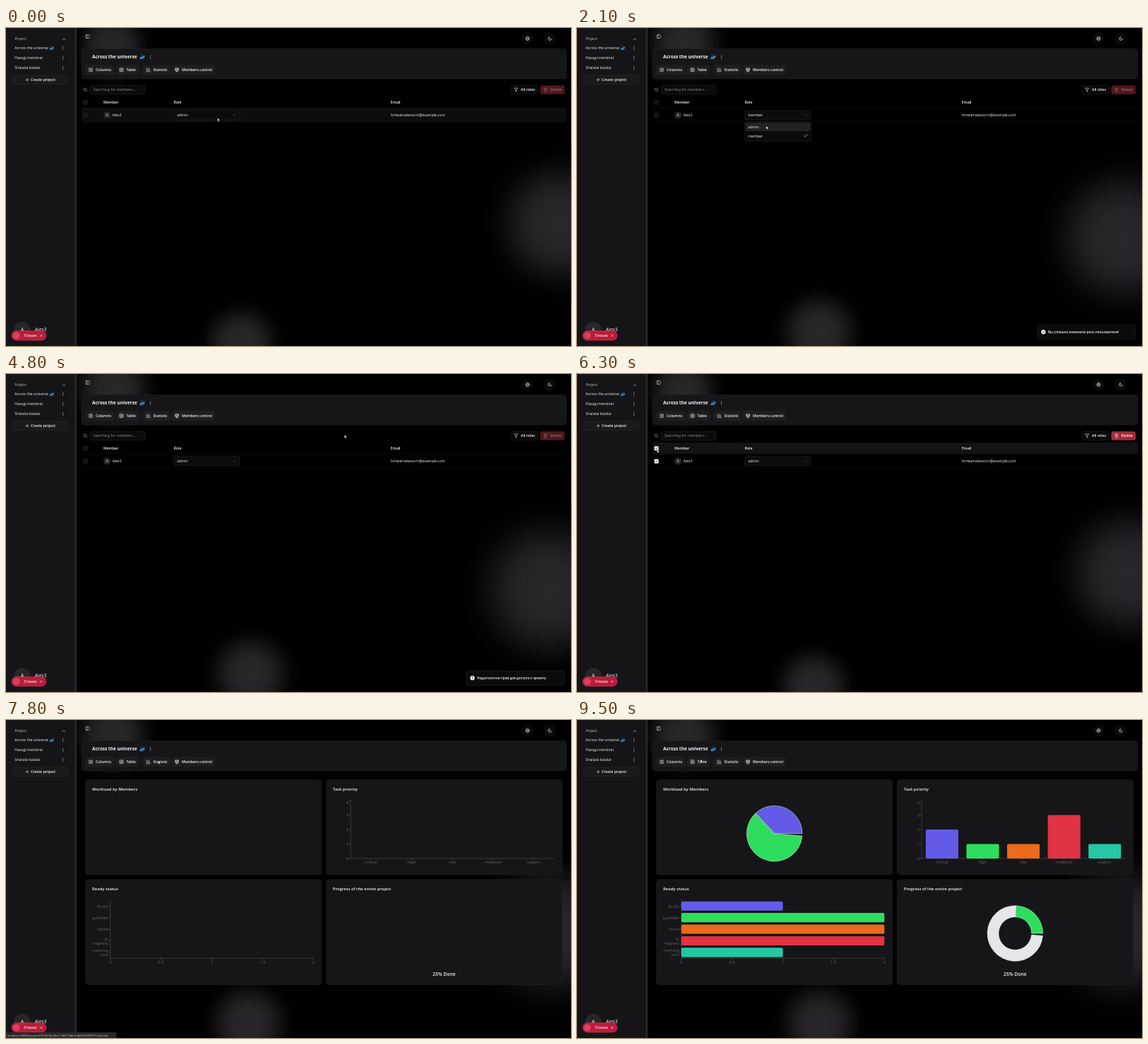
An HTML page that plays this animation: 800x450 px, repeating every 9.6 s.

```html
<!DOCTYPE html>
<html lang="en">
<head>
<meta charset="utf-8">
<title>Members and statistics</title>
<style>
  html, body { margin: 0; width: 100%; height: 100%; overflow: hidden; background: #000; }
  svg { display: block; width: 800px; height: 450px; font-family: "Open Sans", "Noto Sans", sans-serif; }
  text { white-space: pre; }
</style>
</head>
<body>
<svg id="stage" viewBox="0 0 800 450" xmlns="http://www.w3.org/2000/svg"></svg>
<script>
const LOOP = 9600, STEP = 100;
const INK = '#f4f4f5', LINE = '#232327', CARD = '#161618', AXIS = '#666';
const COLORS = ['#635be8', '#2edd5e', '#ec6a1b', '#e03344', '#24c8a5'];
const stage = document.getElementById('stage');

// markup helpers
const text = (x, y, s, size = 5.15, o = {}) =>
  `<text x="${x}" y="${(y + size * 0.36).toFixed(2)}" font-size="${size}" font-weight="${o.w || 400}" ` +
  `fill="${o.fill || INK}" text-anchor="${o.anchor || 'start'}"${o.id ? ` id="${o.id}"` : ''}>${s}</text>`;
const box = (x, y, x2, y2, fill, r = 0, stroke = 'none', extra = '') =>
  `<rect x="${x}" y="${y}" width="${x2 - x}" height="${y2 - y}" rx="${r}" fill="${fill}" stroke="${stroke}" stroke-width=".5" ${extra}/>`;
const line = (d, color = INK, w = 0.55, extra = '') =>
  `<path d="${d}" fill="none" stroke="${color}" stroke-width="${w}" stroke-linecap="round" stroke-linejoin="round" ${extra}/>`;
const dots = (x, y) => [-2, 0, 2].map(d => `<circle cx="${x}" cy="${y + d}" r=".5" fill="${INK}"/>`).join('');
const group = (id, body, extra = '') => `<g id="${id}" ${extra}>${body}</g>`;
const bold = { w: 600 };

const picture = (x, y, s) => `<g transform="translate(${x} ${y}) rotate(14) scale(${s})">
  <rect x="-3" y="-3.5" width="6" height="7" rx="1" fill="#16304f"/>
  <path d="M-3 1L3-3V0L-1 3.4H-3Z" fill="#4b86b4"/><circle cx="1" cy="1.6" r="1" fill="#254f86"/></g>`;

const icons = {
  grid: (x, y) => [[-2.5, -2.5], [.5, -2.5], [-2.5, .5], [.5, .5]]
    .map(([a, b]) => box(x + a, y + b, x + a + 2, y + b + 2, 'none', .4, INK)).join(''),
  table: (x, y) => box(x - 2.5, y - 2.5, x + 2.5, y + 2.5, 'none', .6, INK) +
    line(`M${x} ${y - 2.5}v5M${x - 2.5} ${y - .8}h5M${x - 2.5} ${y + .9}h5`, INK, .45),
  chart: (x, y) => line(`M${x - 2.4} ${y - 2.6}v5.1h5M${x - .8} ${y + 1}v-2M${x + .7} ${y + 1}v-3.6M${x + 2.1} ${y + 1}v-1.2`),
  board: (x, y) => box(x - 2.5, y - 2.4, x + 2.5, y + 1, '#777', .5, INK) + line(`M${x} ${y + 1}v1.5M${x - 1.4} ${y + 2.5}h2.8`)
};

function sidebar() {
  const items = [['Across the universe', 28.5], ['Hasagi mentinel', 42.5], ['Shalalai balalai', 56.5]];
  return box(0, 0, 98, 450, '#151517') + box(97.5, 0, 100, 450, '#29292b') +
    text(12.5, 15.5, 'Projects', 4.4, { fill: '#c9c9cc' }) + line('M80 16.6l1.8-1.8 1.8 1.8') +
    items.map(([s, y]) => text(12.3, y, s, 5.25) + dots(80.5, y - .3)).join('') + picture(65, 28.5, .85) +
    box(9.5, 67, 88, 79.5, '#1a1a1d', 3, '#2c2c30') + line('M28 73.3h4M30 71.3v4') +
    text(35, 73.5, 'Create project', 5.15, bold) +
    `<circle cx="23" cy="427.5" r="11.7" fill="#27272a"/>` + text(23, 427, 'A', 6.6, { anchor: 'middle' }) +
    text(40.8, 426.5, 'Alex3', 6.7) +
    box(8, 428.5, 57, 442, '#be1a3b', 6.7, '#d63a58') + `<circle cx="14.7" cy="435.3" r="5" fill="#d8405c"/>` +
    text(25, 435.3, '3 Issues', 4.9, bold) + line('M48.3 433.9l2.8 2.8M51.1 433.9l-2.8 2.8');
}

function header() {
  const tabs = [['Columns', 'grid', 113, 153], ['Table', 'table', 156.5, 188], ['Statistic', 'chart', 194.5, 232], ['Members control', 'board', 235, 295.5]];
  return box(113, 9.5, 118, 14.5, 'none', .8, INK) + line('M114.8 9.6v4.8') +
    `<circle cx="738.5" cy="15" r="6.8" fill="#0a0a0b" stroke="${LINE}" stroke-width=".5"/>
     <g fill="none" stroke="${INK}" stroke-width=".5"><circle cx="738.5" cy="15" r="2.6"/><ellipse cx="738.5" cy="15" rx="1.1" ry="2.6"/></g>` +
    line('M736 15h5', INK, .45) + box(763, 8.5, 776, 21.5, '#0a0a0b', 3, LINE) +
    line('M769.6 12.7a2.4 2.4 0 1 0 2.7 2.7a1.9 1.9 0 0 1-2.7-2.7') +
    box(107, 29.5, 793.8, 72, CARD, 4, LINE) + text(122, 41, 'Across the universe', 6.5, { w: 700 }) +
    picture(193, 41.2, 1) + dots(204.5, 41) +
    tabs.map(([s, icon, a, b]) => box(a, 52.7, b, 65.7, '#1e1e21', 3, '#262629') + icons[icon](a + 7, 59.2) +
      text(a + 14, 59.2, s, 5.2, bold)).join('');
}

const checkbox = (y) => box(109.6, y - 2.9, 115.4, y + 2.9, '#111', 1.2, '#3a3a3d');
const checked = (y) => box(109.5, y - 3, 115.5, y + 3, INK, 1.2) + line(`M111 ${y}l1.1 1.2 2-2.4`, '#111', .7);

function members() {
  return box(107, 97, 793.8, 113, '#131315', 0, 'none', 'id="headHover"') +
    box(107, 113, 793.8, 133, '#0d0d0f', 0, 'none', 'id="rowHover"') +
    line('M107 113H793.8M107 133H793.8', '#151517', .5) +
    `<circle cx="112" cy="87" r="1.9" fill="none" stroke="#bbb" stroke-width=".55"/>` + line('M113.4 88.5l1.5 1.5', '#bbb') +
    box(119, 81.2, 197, 93.8, '#0b0b0c', 3, '#29292d') + text(123.7, 87.6, 'Searching for members...', 5.13, { fill: '#8e8e95' }) +
    box(715, 81.2, 753.5, 93.8, '#0a0a0b', 3, LINE) + line('M719.8 85h5l-2 2.5v2.6l-1-.6v-2z') + text(729, 87.6, 'All roles', 5.2, bold) +
    group('delete', box(756.5, 81.2, 791, 93.8, '#a52c3a', 3) +
      line('M761.4 85.7h4.6M762.2 85.8l.3 4.4h2.6l.3-4.4M762.9 85.5v-.8h1.7v.8M763.2 87v2M764.3 87v2', INK, .45) +
      text(770.5, 87.6, 'Delete', 5.15, bold)) +
    checkbox(105.2) + checkbox(123.4) + group('checks', checked(105.2) + checked(123.4)) +
    text(138, 105.3, 'Member', 5.2, bold) + text(237.5, 105.3, 'Role', 5.2, bold) + text(544.8, 105.3, 'Email', 5.2, bold) +
    `<circle cx="143" cy="123.4" r="5" fill="#27272a"/>` + text(143, 123.4, 'A', 5, { anchor: 'middle' }) +
    text(150.5, 123.4, 'Alex3') + text(544.8, 123.4, 'forteamalexvorn@example.com') +
    box(237.3, 116.4, 331, 130, '#0c0c0e', 3, '#29292d') + text(242.3, 123.4, 'admin', 5.15, { id: 'role' }) +
    line('M321.8 122.7l1.6 1.6 1.6-1.6', '#77777c', .5) +
    group('menu', box(237.3, 132.5, 331.7, 160, '#0a0a0b', 3, '#2b2b2f') +
      box(238.5, 134, 330.5, 146, '#222225', 2, 'none', 'id="pick"') +
      text(242.3, 140.2, 'admin') + text(242.3, 152.8, 'member') + line('M321.7 0l1.5 1.5 2.8-3.2', INK, .6, 'id="tick"'));
}

function statistic() {
  const frame = (x, y, x2, y2, s) => box(x, y, x2, y2, CARD, 4, LINE) + text(x + 9.6, y + 13, s, 5.9, bold);
  const label = (x, y, s, anchor) => text(x, y, s, 6, { fill: AXIS, anchor });
  const rows = [['To Do', 263.7], ['gumbler', 280], ['Done', 296.3], ['In', 309.7], ['Progress', 315.8], ['Something', 326], ['cool', 332.3]];
  let s = frame(112.5, 84.6, 446.6, 219, 'Workload by Members') + frame(453.2, 84.6, 787.5, 219, 'Task priority') +
    frame(112.5, 225.7, 446.6, 374.5, 'Ready status') + frame(453.2, 225.7, 787.5, 374.5, 'Progress of the entire project');
  s += line('M488 114V196H776M147.7 255V337H435', AXIS, .45);
  for (let i = 0; i < 5; i++) {
    const y = 196 - 20.5 * i, x = 516.8 + 57.6 * i, hx = 147.7 + 71.85 * i, hy = 263.2 + 16.4 * i;
    s += line(`M485.6 ${y}H488M${x} 196v2.4M${hx} 337v2.4M145.3 ${hy}h2.4`, AXIS, .45);
    s += label(485, Math.max(y, 116.8), i, 'end') + label(x, 201.3, ['critical', 'high', 'low', 'medium', 'urgent'][i], 'middle');
    s += label(hx, 342.5, i / 2, 'middle');
  }
  s += group('', rows.map(([r, y]) => label(144.8, y, r, 'end')).join(''), 'clip-path="url(#labels)"');
  return s + group('charts', '') + text(620.3, 359.8, '25% Done', 6.75, bold, 0).replace('start', 'middle');
}

const toast = (id, s, mark) => group(id, box(652, 420, 790.7, 440.3, '#0b0b0c', 3, '#29292d') +
  `<circle cx="660.4" cy="430.2" r="3.1" fill="${INK}"/>` + line(mark, '#0b0b0c', .7) + text(667, 430.4, s, 4.6, bold));

const falloff = [[0, 1], [.3, .93], [.48, .72], [.64, .42], [.8, .15], [.9, .05], [1, 0]]
  .map(([o, a]) => `<stop offset="${o}" stop-color="#28282b" stop-opacity="${a}"/>`).join('');

stage.innerHTML = `<defs><radialGradient id="glow">${falloff}</radialGradient>
  <clipPath id="labels"><rect x="122.3" y="250" width="30" height="90"/></clipPath></defs>
  <rect width="800" height="450" fill="#000"/>` +
  [0, 1, 2].map(i => `<circle id="blob${i}" fill="url(#glow)"/>`).join('') +
  header() + group('members', members()) + group('statistic', statistic()) + sidebar() +
  toast('done', 'Вы успешно изменили роль пользователя!', 'M658.9 430.3l1.1 1.1 2-2.3') +
  toast('denied', 'Недостаточно прав для доступа к проекту', 'M660.4 428.4v2M660.4 431.9v.1') +
  group('link', box(0, 442, 156.5, 450, '#28282b', 1) +
    text(1.6, 446, 'localhost:3000/project/f353410a-3be1-4b57-8dcd-da472f399731/statistic', 4.25, { fill: '#d0d0d3' })) +
  `<path id="cursor" d="M0 0V4.7L1.1 3.7 1.9 5.4 2.7 5 1.9 3.4H3.3Z" fill="#fff" stroke="#000" stroke-width=".35"/>`;

const el = {};
stage.querySelectorAll('[id]').forEach(n => { el[n.id] = n; });
const show = (id, on) => el[id].setAttribute('visibility', on ? 'visible' : 'hidden');
const within = (t, a, b) => t >= a && t < b;
const clamp = v => Math.min(1, Math.max(0, v));
const mix = (a, b, k) => a + (b - a) * k;

// CSS "ease" curve
function ease(x) {
  let lo = 0, hi = 1;
  const bez = (u, a, b) => 3 * u * (1 - u) ** 2 * a + 3 * u * u * (1 - u) * b + u ** 3;
  for (let i = 0; i < 18; i++) {
    const mid = (lo + hi) / 2;
    if (bez(mid, .25, .25) < x) lo = mid; else hi = mid;
  }
  return x <= 0 ? 0 : x >= 1 ? 1 : bez(lo, .1, 1);
}

// rows of [time, ...values], smoothly joined
function track(rows, t) {
  const i = rows.findIndex(r => r[0] > t);
  if (i < 0) return rows[rows.length - 1].slice(1);
  const a = rows[i - 1], b = rows[i], k = (t - a[0]) / (b[0] - a[0]);
  return a.slice(1).map((v, n) => mix(v, b[n + 1], k * k * (3 - 2 * k)));
}

const pointer = [[0, 299.5, 127.3], [900, 297, 125], [1100, 292, 125], [1400, 272, 152], [1500, 274, 150], [1800, 276, 125],
  [2100, 267.8, 138.5], [2900, 267.8, 138.5], [3100, 330, 92], [4000, 736.5, 88], [4200, 736.5, 87], [4600, 736.5, 87],
  [4800, 479.3, 86], [5000, 420, 86], [5500, 120, 91], [5700, 113.5, 106.7], [6900, 113.5, 106.7], [7400, 213, 59],
  [7800, 215.5, 57.5], [8600, 213.5, 56], [8900, 213.5, 56], [9300, 178, 55.5], [9500, 175, 55.5]];
const drift = [[0, 0], [2100, .7], [4100, 1], [4600, 1], [6300, .15], [7800, .75], [8600, .9], [9500, .75]];
const blobs = [[[150, 26, 62], [152, 20, 70]], [[784, 277, 112], [768, 306, 128]], [[333, 446, 66], [347, 424, 72]]];

function sector(cx, cy, r, inner, a, b, fill) {
  const at = (rad, deg) => `${(cx + rad * Math.cos(deg * Math.PI / 180)).toFixed(2)} ${(cy - rad * Math.sin(deg * Math.PI / 180)).toFixed(2)}`;
  const big = b - a > 180 ? 1 : 0;
  const back = inner ? `L${at(inner, b)}A${inner} ${inner} 0 ${big} 1 ${at(inner, a)}` : `L${cx} ${cy}`;
  return `<path d="M${at(r, a)}A${r} ${r} 0 ${big} 0 ${at(r, b)}${back}Z" fill="${fill}" stroke="#fff" stroke-width=".45"/>`;
}

function charts(t) {
  const grow = ease((t - 7800) / 400), sweep = 359.9 * ease((t - 8225) / 1500);
  let s = '';
  if (grow > 0) COLORS.forEach((c, i) => {
    const h = 20.5 * [2, 1, 1, 3, 1][i] * grow, w = 143.7 * [1, 2, 2, 2, 1][i] * grow;
    s += box(493.8 + 57.6 * i, 196 - h, 539.9 + 57.6 * i, 196, c, Math.min(1.7, h / 2));
    s += box(147.8, 256.7 + 16.4 * i, 147.8 + w, 269.8 + 16.4 * i, c, Math.min(1.7, w / 2));
  });
  if (sweep > 0) {
    s += sector(279.6, 160.7, 39.3, 0, 0, sweep * .375, COLORS[0]) + sector(279.6, 160.7, 39.3, 0, sweep * .375, sweep, COLORS[1]);
    s += sector(620.3, 302, 39.3, 23.3, 0, sweep * .25, COLORS[1]) + sector(620.3, 302, 39.3, 23.3, sweep * .25, sweep, '#e5e5ea');
  }
  el.charts.innerHTML = s;
}

function slide(id, t, start, end) {
  const k = ease((t - start) / 400), out = ease((t - end) / 300);
  show(id, within(t, start, end + 300));
  el[id].setAttribute('opacity', clamp(k * 1.2) * (1 - out));
  el[id].setAttribute('transform', `translate(0 ${(1 - k + out) * 24})`);
}

function draw(t) {
  const [d] = track(drift, t);
  blobs.forEach(([a, b], i) => ['cx', 'cy', 'r'].forEach((k, n) => el['blob' + i].setAttribute(k, mix(a[n], b[n], d))));

  const stats = t >= 7700;
  el.members.style.display = stats ? 'none' : '';
  el.statistic.style.display = stats ? '' : 'none';
  if (stats) charts(t);

  show('rowHover', t < 1100 || within(t, 1500, 1800));
  show('headHover', within(t, 5600, 6900));
  const picked = t >= 6000;
  show('checks', picked);
  el.delete.setAttribute('opacity', picked ? 1 : .5);

  const isMember = within(t, 1400, 2400);
  el.role.textContent = isMember ? 'member' : 'admin';
  show('menu', within(t, 1100, 1400) || within(t, 1800, 2400));
  el.pick.setAttribute('y', within(t, 1300, 1400) ? 146.7 : 134);
  el.tick.setAttribute('transform', `translate(0 ${isMember ? 152.4 : 139.8})`);

  slide('done', t, 1600, 2600);
  slide('denied', t, 2600, 5100);
  show('link', within(t, 7400, 9100));

  const [x, y] = track(pointer, t);
  el.cursor.setAttribute('transform', `translate(${x.toFixed(2)} ${y.toFixed(2)})`);
}

const begin = performance.now();
function tick() {
  const t = (performance.now() - begin) % LOOP;
  draw(Math.floor(t / STEP) * STEP);
  requestAnimationFrame(tick);
}
tick();
</script>
</body>
</html>
```
